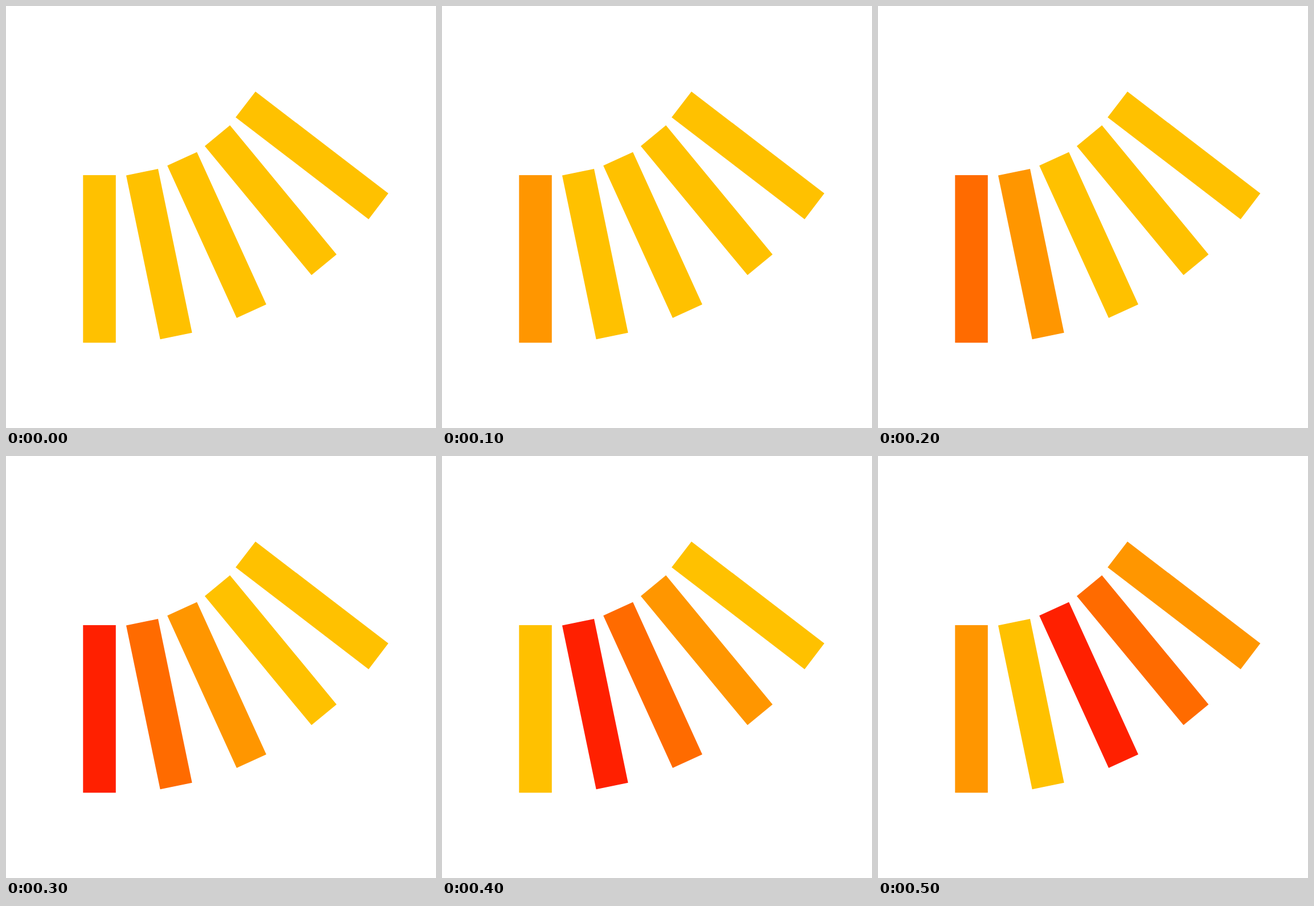
An HTML page for the animation above (600 ms loop, 755x741 px).

```html
<!DOCTYPE html>
<html lang="en">
<head>
<meta charset="utf-8">
<title>Fan of bars</title>
<style>
  html, body { margin: 0; width: 100%; height: 100%; overflow: hidden; background: #fff; }
  svg { display: block; width: 755px; height: 741px; }
</style>
</head>
<body>
<svg viewBox="0 0 755 741" fill="#ffc100">
  <polygon points="135.3,297.1 192.8,297.1 192.8,591.3 135.3,591.3"/>
  <polygon points="211,297.5 267,286 326.7,573.8 270.7,585.3"/>
  <polygon points="283.2,280.2 335.2,256.5 457,524 405,547.7"/>
  <polygon points="349,246 393.2,209.5 580.4,436.2 536.4,472.6"/>
  <polygon points="403.2,195.5 438,150.2 671.3,329 636.7,374.4"/>
</svg>
<script>
  const heat = ['#ffc100', '#ff9600', '#ff6b00', '#ff2000'];
  const steps = 6, stepMs = 100;

  // Each bar starts to heat one step after its neighbour, then cycles.
  document.querySelectorAll('polygon').forEach((bar, i) => {
    const frames = [];
    for (let s = 0; s < steps; s++) {
      frames.push({
        fill: heat[Math.max(0, s - i) % heat.length],
        offset: s / steps,
        easing: 'steps(1, end)'
      });
    }
    frames.push({ ...frames[steps - 1], offset: 1 });
    const anim = bar.animate(frames, { duration: steps * stepMs, iterations: Infinity });
    anim.startTime = 0;
  });
</script>
</body>
</html>
```
